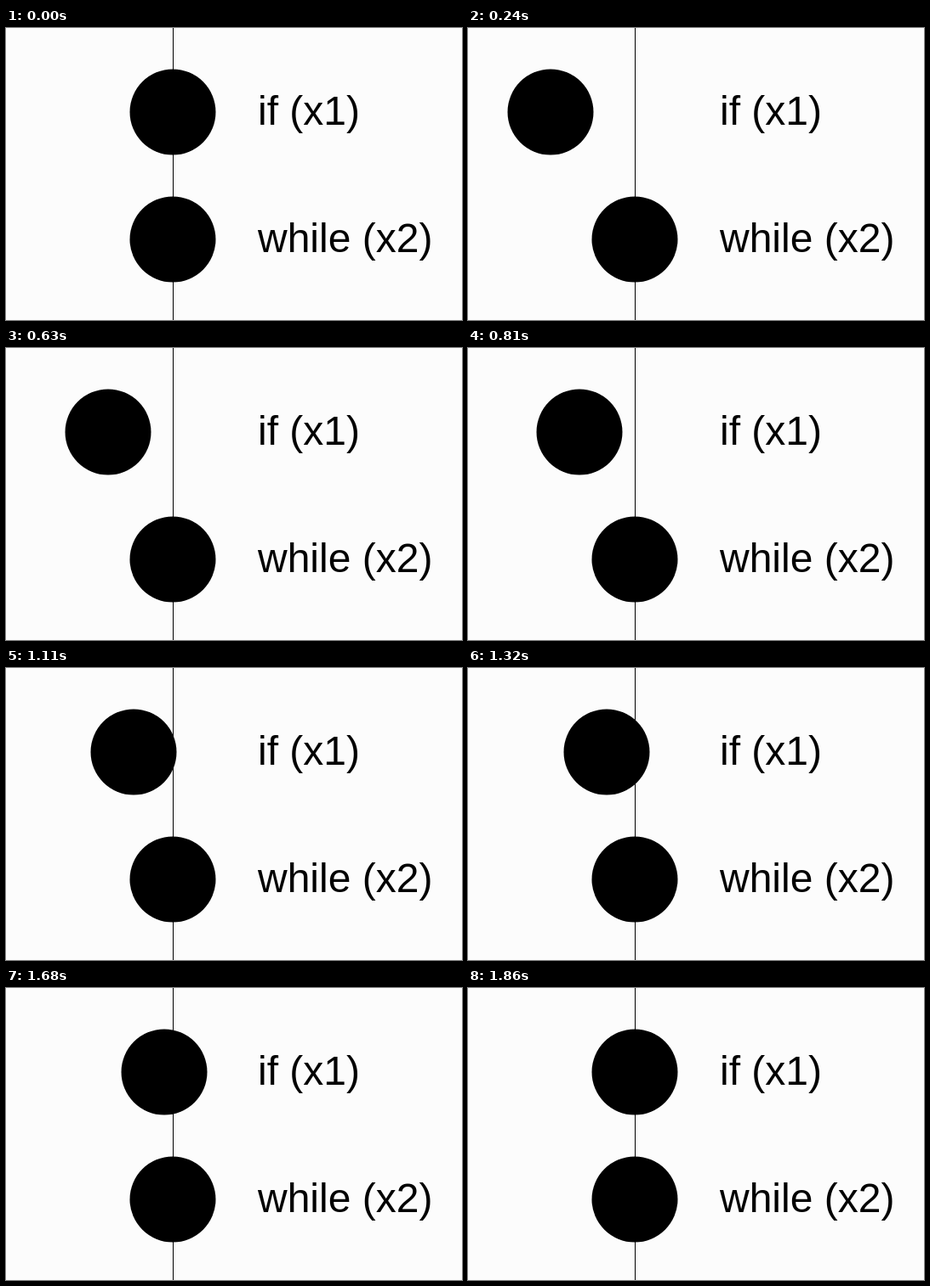
These frames come from a looping animation (536x344 px, 3.24 s). An HTML page:

```html
<!DOCTYPE html>
<html lang="en">
<head>
<meta charset="utf-8">
<title>Loop</title>
<style>
  html, body { margin: 0; width: 100%; height: 100%; overflow: hidden; background: #fcfcfc; }
  svg { display: block; width: 536px; height: 344px; }
  text { font: 48px "Liberation Sans", Arial, sans-serif; }
</style>
</head>
<body>
<svg viewBox="0 0 536 344">
  <rect x="196" width="1" height="344"/>
  <circle id="ball" cx="196" cy="99" r="50.5"/>
  <circle cx="196" cy="249" r="50.5"/>
  <text x="296" y="114">if (x1)</text>
  <text x="296" y="264">while (x2)</text>
</svg>
<script>
  const LOOP = 3240, START = 240, TICK = 30;
  const REST_X = 196, TRAVEL = 100, SPEED = 1.88;
  const ball = document.getElementById("ball");

  // Whole-pixel slide back to the line after a sudden jump left.
  function ballX(t) {
    if (t < START) return REST_X;
    const tick = Math.floor((t - START) / TICK);
    const moved = Math.floor(0.1 + SPEED * tick);
    return REST_X - TRAVEL + Math.min(TRAVEL, Math.max(1, moved));
  }

  const origin = performance.now();
  function draw(now) {
    const t = Math.max(0, now - origin) % LOOP;
    ball.setAttribute("cx", ballX(t));
    requestAnimationFrame(draw);
  }
  requestAnimationFrame(draw);
</script>
</body>
</html>
```
